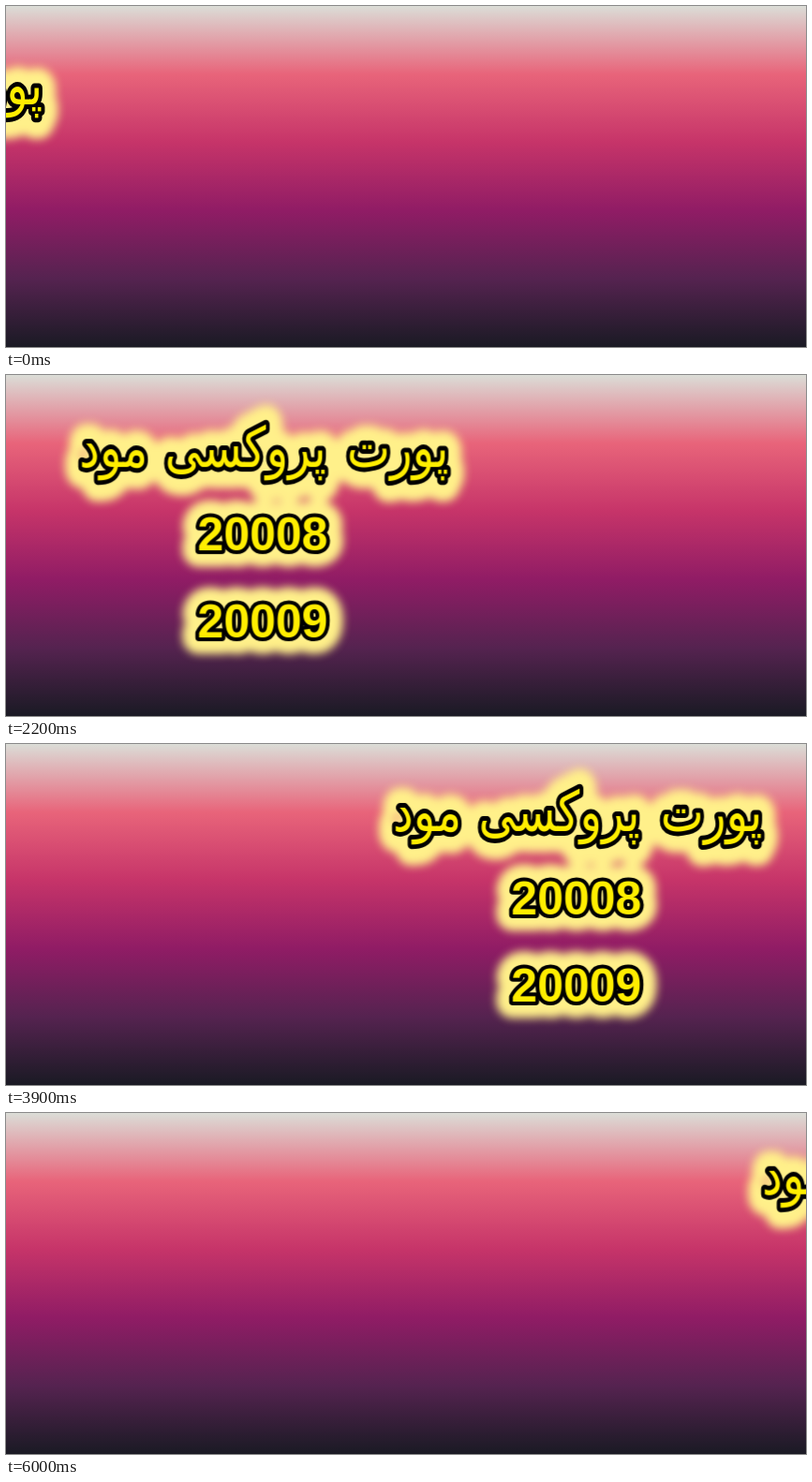
An HTML page that plays this animation: 854x364 px, repeating every 6.1 s.

```html
<!DOCTYPE html>
<html lang="fa">
<head>
<meta charset="utf-8">
<title>پورت پروکسی مود</title>
<style>
  html, body {
    margin: 0;
    width: 100%;
    height: 100%;
    overflow: hidden;
  }
  body {
    background: linear-gradient(#dbddd7, #e8647a 20%, #c63469 40%, #901c65 60%, #552350 80%, #1a1a24);
  }
  svg {
    position: absolute;
    left: 0;
    top: 0;
    width: 854px;
    height: 364px;
  }
  text {
    text-anchor: middle;
  }
  /* tall lettering with long descenders */
  .words {
    font: 49px "DejaVu Sans", sans-serif;
    direction: rtl;
    transform: translateY(96.5px) scaleY(1.22);
  }
  .numbers {
    font: bold 50px "Liberation Sans", Arial, sans-serif;
  }
  .glow {
    fill: #fff08a;
    stroke: #fff08a;
    stroke-width: 36px;
    stroke-linejoin: round;
    filter: url(#soft);
  }
  .face {
    fill: #ffee00;
    stroke: #000;
    stroke-width: 8px;
    stroke-linejoin: round;
    paint-order: stroke;
  }
  /* 59 jumps of 100 ms, then the last pose holds for two ticks */
  .slide {
    animation: slide 6.1s infinite;
  }
  @keyframes slide {
    0% {
      transform: translate(-551.6px, 8.7px);
      animation-timing-function: steps(59, end);
    }
    96.7213%, 100% {
      transform: translate(610.7px, -9.6px);
    }
  }
</style>
</head>
<body>
<svg viewBox="0 0 854 364">
  <defs>
    <filter id="soft" filterUnits="userSpaceOnUse" x="140" y="0" width="520" height="350" color-interpolation-filters="sRGB">
      <feGaussianBlur stdDeviation="5"/>
    </filter>
    <g id="lines">
      <g class="words">
        <text x="536.5">پورت</text>
        <text x="374">پروکسی</text>
        <text x="233">مود</text>
      </g>
      <g class="numbers">
        <text x="392.2" y="185.2">20008</text>
        <text x="392.2" y="278.2">20009</text>
      </g>
    </g>
  </defs>
  <g class="slide">
    <use class="glow" href="#lines"/>
    <use class="face" href="#lines"/>
  </g>
</svg>
</body>
</html>
```
